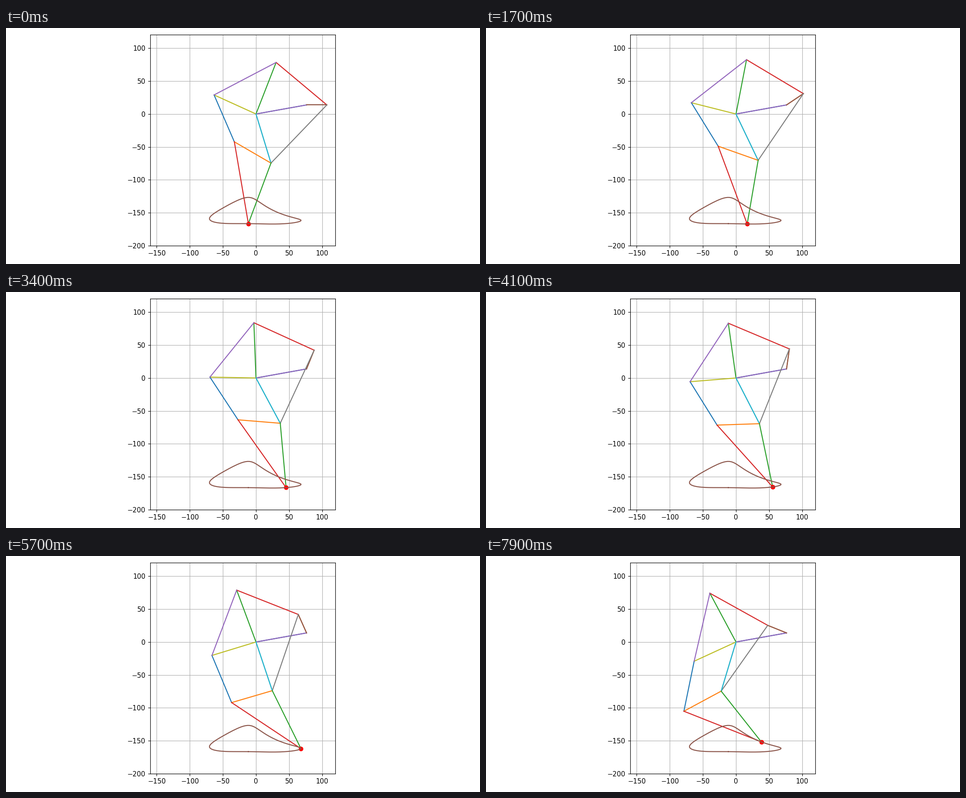
A matplotlib script for the animation above (8000 ms loop, 1058 by 529 pixels).

```python
import numpy as np
import matplotlib.pyplot as plt
from matplotlib.animation import FuncAnimation

FRAMES, INTERVAL = 80, 100
W, H, DPI = 1058, 529, 105.8
STEP = 2  # crank degrees per frame

PIVOT = 0j
MOTOR = 76.4 + 13.75j
CRANK = 30.65


def meet(p, rp, q, rq, side):
    """Joint at distance rp from p and rq from q; side +1 is left of p->q."""
    d = abs(q - p)
    a = (rp**2 - rq**2 + d**2) / (2 * d)
    h = np.sqrt(rp**2 - a**2)
    return p + (a + side * 1j * h) * (q - p) / d


def joints(deg):
    crank = MOTOR + CRANK * np.exp(1j * np.radians(deg))
    top = meet(PIVOT, 83.9, crank, 100.15, 1)
    hip = meet(PIVOT, 77.87, crank, 122.12, -1)
    left = meet(PIVOT, 69.6, top, 105.9, 1)
    knee = meet(left, 77.45, hip, 64.05, -1)
    foot = meet(knee, 125.9, hip, 98.0, -1)
    return dict(o=PIVOT, m=MOTOR, c=crank, t=top, h=hip, l=left, k=knee, f=foot)


# Each link names its two joints and its colour in the default cycle.
LINKS = [
    ("om", 0), ("mc", 1), ("ot", 2), ("tc", 3),
    ("om", 4), ("mc", 5), ("oh", 6), ("hc", 7),
    ("ol", 8), ("oh", 9), ("lk", 0), ("kh", 1),
    ("hf", 2), ("kf", 3), ("tl", 4),
]

plt.rcParams["font.family"] = "DejaVu Sans"
fig = plt.figure(figsize=(W / DPI, H / DPI), dpi=DPI, facecolor="white")

x0, top_y, scale = 321.62, 15.47, 1.4773
width, height = 280 * scale, 320 * scale
ax = fig.add_axes([x0 / W, 1 - (top_y + height) / H, width / W, height / H])
ax.set_xlim(-160, 120)
ax.set_ylim(-200, 120)
ax.set_xticks(range(-150, 101, 50))
ax.set_yticks(range(-200, 101, 50))
ax.grid(True)

bars = [ax.plot([], [], color=f"C{c}", lw=1.5)[0] for _, c in LINKS]
dot, = ax.plot([], [], "ro", ms=6)
path = joints(np.arange(0, 361, STEP))["f"]
ax.plot(path.real, path.imag, color="C5", lw=1.5)


def draw(i):
    pos = joints(i * STEP)
    for bar, ((a, b), _) in zip(bars, LINKS):
        ends = np.array([pos[a], pos[b]])
        bar.set_data(ends.real, ends.imag)
    dot.set_data([pos["f"].real], [pos["f"].imag])
    return bars + [dot]


anim = FuncAnimation(fig, draw, frames=FRAMES, interval=INTERVAL,
                     init_func=lambda: draw(0), repeat=True, repeat_delay=0)
plt.show()
```
